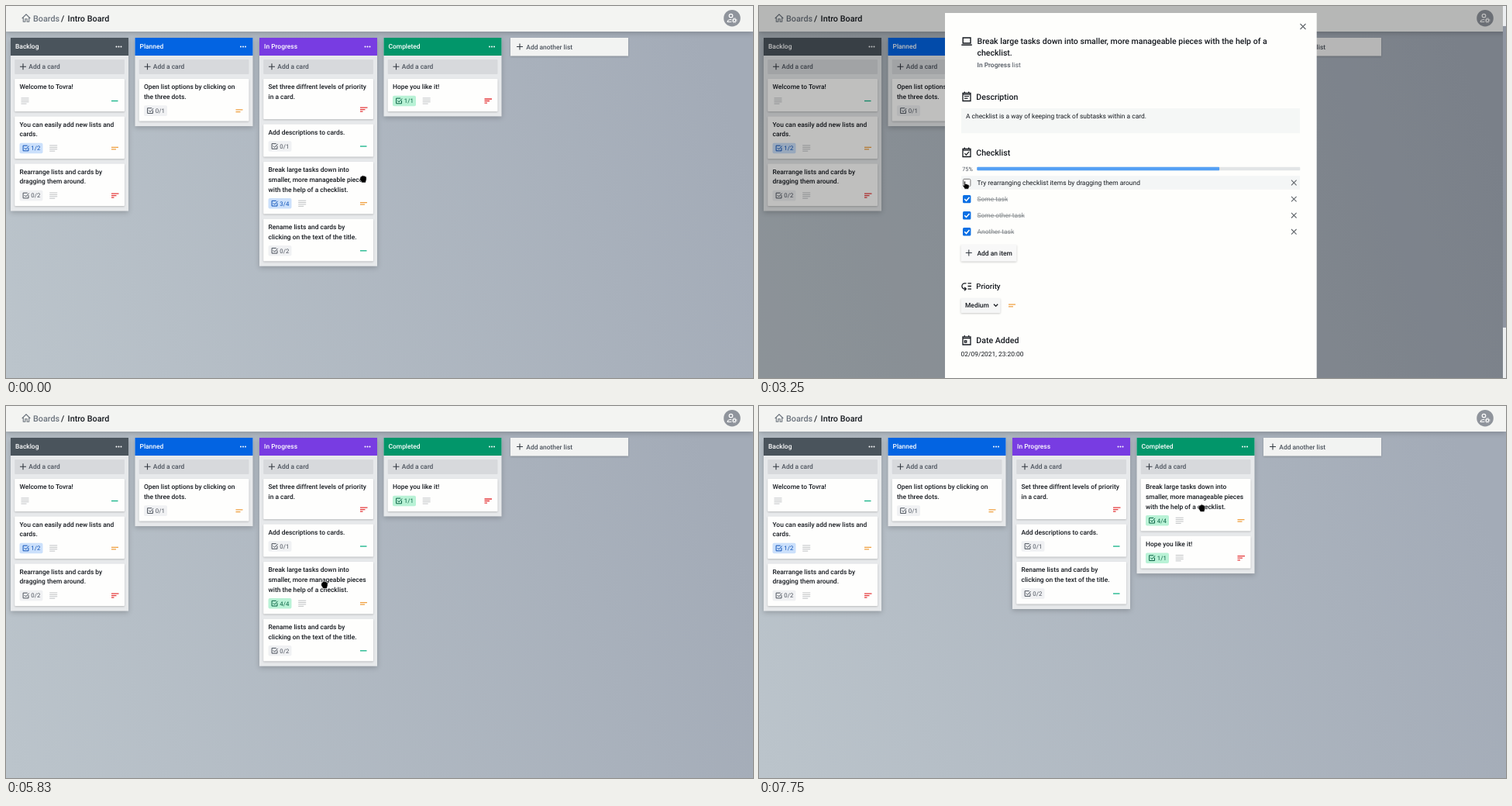
An HTML page that plays this animation: 964x480 px, repeating every 8 s.

```html
<!DOCTYPE html>
<html lang="en">
<head>
<meta charset="utf-8">
<title>Task board</title>
<style>
  html, body { margin: 0; height: 100%; overflow: hidden; }
  svg { display: block; width: 100vw; height: 100vh; }
  text { font: 500 8.43px Roboto, sans-serif; fill: #15191f; text-rendering: geometricPrecision; white-space: pre; }
  .plain { font-weight: 400; }
  .small { font-size: 7.8px; font-weight: 400; }
  .head { font-size: 10.6px; }
  .muted { fill: #4d545e; }
  .struck { font-weight: 400; fill: #858a8e; text-decoration: line-through; }
  .shadow { filter: drop-shadow(0 1px 1px rgba(0, 0, 0, .2)); }
  .lifted { filter: drop-shadow(0 2px 3px rgba(0, 0, 0, .2)); }
</style>
</head>
<body>
<svg id="stage" viewBox="0 0 964 480" preserveAspectRatio="none"></svg>
<script>
const LOOP = 8000, OPEN = 670, CHECK = 3330, CLOSE = 5000, LIFT = 5850, LEAVE = 6193, DROP = 6830, LANDED = 7100;
const LINE = 12.65, TOP = 94;
const INK = '#15191f';
const $ = id => document.getElementById(id);

// Drawing helpers
const rect = (x, y, w, h, fill, extra = '') =>
  `<rect x="${x}" y="${y}" width="${w}" height="${h}" fill="${fill}" ${extra}/>`;
const text = (x, y, s, extra = '') => `<text x="${x}" y="${y}" ${extra}>${s}</text>`;
const path = (d, color, width = 1.2) =>
  `<path d="${d}" fill="none" stroke="${color}" stroke-width="${width}"/>`;
const group = (x, y, body, extra = '') => `<g transform="translate(${x} ${y})" ${extra}>${body}</g>`;
const plus = (x, y) => path(`M${x - 4} ${y}h8M${x} ${y - 4}v8`, '#343a42', 1.1);
const cross = (x, y, r) => path(`M${x - r} ${y - r}l${2 * r} ${2 * r}m0 ${-2 * r}l${-2 * r} ${2 * r}`, '#62676c', 1.1);

const priorities = {
  low: ['#12b387', 'M0 0h8.5'],
  medium: ['#f0a040', 'M0-1.2h9M0 1.4h6'],
  high: ['#e53a3c', 'M0-2.5h9.5M0 0h6.5M0 2.6h3.5']
};
const priority = (x, y, kind) => group(x, y, path(priorities[kind][1], priorities[kind][0], 1.3));
const badgeColors = { idle: ['#f0f1f3', '#4c535d'], part: ['#cbe0fb', '#0f52b8'], full: ['#b9f2d6', '#0b6345'] };

function badge(label, kind) {
  const [back, ink] = badgeColors[kind];
  return rect(0, -6.8, 30, 13.6, back, 'rx="2"') +
    path('M11.5-.5V3.3H4.6V-3.4H10.2M6.3-.5l1.8 1.9 4-4.4', ink, 1) +
    text(14.8, 2.8, label, `class="small" style="fill:${ink}"`);
}

const cardHeight = c => 29.25 + LINE * c.lines.length - (c.bare ? 2.5 : 0);
const pitch = c => cardHeight(c) + 6.5;

function drawCard(c) {
  const row = 28.5 + LINE * (c.lines.length - 1) - (c.bare ? 1.6 : 0);
  return rect(0, 0, 141.8, cardHeight(c), '#fefefd', 'rx="1" class="shadow"') +
    c.lines.map((s, i) => text(6.3, 13.3 + i * LINE, s)).join('') +
    (c.badge ? group(6.3, row, badge(...c.badge), c.id ? `id="${c.id}Badge"` : '') : '') +
    (c.desc ? group(c.badge ? 45 : 8.3, row, path('M0-3.6h10M0-1.2h10M0 1.2h10M0 3.6h7', '#b9bcbf', .9)) : '') +
    priority(124.8, row, c.prio);
}

const lists = [
  { name: 'Backlog', color: '#4a545c', cards: [
    { lines: ['Welcome to Tovra!'], desc: true, prio: 'low' },
    { lines: ['You can easily add new lists and', 'cards.'], badge: ['1/2', 'part'], desc: true, prio: 'medium' },
    { lines: ['Rearrange lists and cards by', 'dragging them around.'], badge: ['0/2', 'idle'], desc: true, prio: 'high' }] },
  { name: 'Planned', color: '#0364e2', cards: [
    { lines: ['Open list options by clicking on', 'the three dots.'], badge: ['0/1', 'idle'], prio: 'medium' }] },
  { name: 'In Progress', color: '#783ce2', cards: [
    { id: 'levels', lines: ['Set three diffrent levels of priority', 'in a card.'], bare: true, prio: 'high' },
    { id: 'descs', lines: ['Add descriptions to cards.'], badge: ['0/1', 'idle'], prio: 'low' },
    { id: 'moved', lines: ['Break large tasks down into', 'smaller, more manageable pieces', 'with the help of a checklist.'],
      badge: ['3/4', 'part'], desc: true, prio: 'medium' },
    { id: 'rename', lines: ['Rename lists and cards by', 'clicking on the text of the title.'], badge: ['0/2', 'idle'], prio: 'low' }] },
  { name: 'Completed', color: '#02966a', cards: [
    { id: 'hope', lines: ['Hope you like it!'], badge: ['1/1', 'full'], desc: true, prio: 'high' }] }
];

let floating = '';
const home = {};

function drawList(list, i) {
  const x = 6 + 160.5 * i;
  let y = TOP, cards = '';
  for (const c of list.cards) {
    const g = group(x + 5.2, y, drawCard(c), c.id ? `id="${c.id}"` : '');
    if (c.id) home[c.id] = { x: x + 5.2, y };
    if (c.id === 'moved') floating = g; else cards += g;
    y += pitch(c);
  }
  list.height = y - 41;
  return rect(x, 41, 152, list.height, '#e7e9eb', `id="body${i}" class="lifted"`) +
    rect(x, 90, 152, y - 90, '#c8f2dd', `id="over${i}" opacity="0"`) +
    rect(x, 41, 152, 23, list.color) +
    text(x + 6, 55.3, list.name, 'style="fill:#fff"') +
    [-3, 0, 3].map(d => `<circle cx="${x + 139.5 + d}" cy="52.5" r="1" fill="#fff"/>`).join('') +
    rect(x + 5.2, 69, 141.8, 19, '#d7d9dc', 'rx="1"') + plus(x + 16, 78.3) +
    text(x + 23.3, 81.4, 'Add a card', 'class="muted"') + cards;
}

function drawHeader() {
  return rect(0, 0, 964, 33, '#f3f4f2', 'class="lifted"') +
    path('M20.7 16l5.3-5.2 5.3 5.2M22.3 15v5.2h2.5v-3.4h2.4v3.4h2.5V15', '#6b737d', 1.1) +
    text(35, 19.5, 'Boards', 'style="font-size:10.8px;fill:#6b737d"') +
    text(71, 19.5, '/', 'style="font-size:10.8px"') + text(79.6, 19.5, 'Intro Board', 'style="font-size:10.8px"') +
    '<circle cx="937" cy="15.7" r="10.8" fill="#8f949c"/>' +
    '<circle cx="935.5" cy="12.6" r="2.3" fill="none" stroke="#fff" stroke-width="1.2"/>' +
    path('M936 17.5c-3 0-4.8 1-4.8 3h5', '#fff') +
    '<circle cx="940" cy="18.6" r="1.8" fill="none" stroke="#fff" stroke-width="1.2"/>' +
    '<circle cx="940" cy="18.6" r="3" fill="none" stroke="#fff" stroke-dasharray="1.2 1.16"/>';
}

// Card dialog
const sheet = (y, mark) => group(268, y, path('M-5-4.6H5V5.5H-5ZM-5-2.8H5M-2.7-6.5v2M2.7-6.5v2', INK, 1.3) + path(mark, INK, 1.2));
const tick = y => rect(263, y - 5.2, 10.4, 10.4, '#0b6fe4', 'rx="1.5"') + path(`M265.3 ${y}l2.2 2.3 4-4.6`, '#fff', 1.5);
const doneItem = (y, label) => tick(y) + text(281.5, y + 3, label, 'class="struck"');
const firstItem = 'Try rearranging checklist items by dragging them around';
const items = ['Some task', 'Some other task', 'Another task'];

function drawDialog() {
  return rect(240, 41, 479.7, 551, '#fefefc') + cross(702, 58.5, 3.5) +
    path('M263.2 73h9.8v7h-9.8ZM261.3 82.3h13.5', INK, 1.4) +
    text(281.5, 81.2, 'Break large tasks down into smaller, more manageable pieces with the help of a', 'style="font-size:10.54px"') +
    text(281.5, 95.8, 'checklist.', 'style="font-size:10.54px"') +
    text(281.5, 111, 'In Progress<tspan class="plain"> list</tspan>', 'class="muted"') +
    sheet(149, 'M-3-.5H3M-3 2.2H1.5') + text(280.3, 152.5, 'Description', 'class="head"') +
    rect(261, 164, 437, 32.3, '#f5f7f6') +
    text(267, 177, 'A checklist is a way of keeping track of subtasks within a card.', 'class="plain"') +
    sheet(221, 'M-2.6 1.2l2 2 3.6-4') + text(280.3, 225, 'Checklist', 'class="head"') +
    text(275.8, 244.6, '75%', 'id="percent" class="plain" text-anchor="end" style="font-size:7.3px;fill:#4d545e"') +
    rect(281.3, 239.8, 417, 4.4, '#e2e5e6', 'rx="1"') + rect(281.3, 239.8, 0, 4.4, '#55a0f4', 'id="bar" rx="1"') +
    rect(261, 251.3, 437, 17.5, '#f4f6f6', 'id="hover"') +
    `<g id="todo">${rect(263.5, 255.3, 9.4, 9.4, '#fff', 'rx="1.3" stroke="#767676"')}${text(281.5, 263, firstItem, 'class="plain"')}</g>` +
    `<g id="done">${doneItem(260, firstItem)}</g>` +
    items.map((s, i) => doneItem(281.1 + 21.1 * i, s)).join('') +
    [0, 1, 2, 3].map(i => cross(690.3, 260 + 21.1 * i, 3.3)).join('') +
    rect(260.5, 340, 72, 21.5, '#f8f8f8', 'rx="1" class="shadow"') + plus(270.8, 350.5) + text(281.5, 353.6, 'Add an item') +
    group(268, 393.5, path('M1.5-3.6H6M1.5 0H6M1.5 3.6H6M-.5-3.6h-2a3.6 3.6 0 0 0 0 7.2h1.5M-2.8 1.5l2 2.1-2 2.1', INK, 1.3)) +
    text(280.3, 397, 'Priority', 'style="font-size:9.64px"') +
    rect(260.5, 409, 51, 19, '#f5f6f6', 'rx="1" class="shadow"') + text(266, 421.4, 'Medium') +
    path('M303 416.8l2.6 2.6 2.6-2.6', INK, 1.3) + priority(322, 418.4, 'medium') +
    sheet(463.5, 'M-2.6 .3h2.4v2.4h-2.4Z') + text(280.3, 467.4, 'Date Added', 'class="head"') +
    text(260.5, 484, '02/09/2021, 23:20:00', 'class="plain"');
}

const pointers = {
  arrow: 'M0 0V9.2L2.2 7.2 3.6 10.4 5 9.8 3.6 6.7H6.5Z',
  fist: 'M-4-1.2C-4-3-2.8-3.6-2-3.2-1.5-4.4-.2-4.4.3-3.7 1-4.4 2.2-4 2.4-3.1 3.4-3.3 4.2-2.6 4.2-1.6V.8C4.2 2.4 3.2 3.2 3.2 5H-2C-2 3.6-4.4 1.6-4.4.4Z',
  finger: 'M-2.4-4C-2.4-5.4-.7-5.4-.7-4V-1.2C0-1.8 1-1.5 1.2-.9 2-1.3 2.8-.8 2.9-.2 3.7-.4 4.2.1 4.2.9V2.4C4.2 3.6 3.3 4 3.3 5.2H-1.6C-1.6 3.8-4 2-4.2.6-4.2-.4-3-.2-2.4.6Z'
};

$('stage').innerHTML =
  '<defs><linearGradient id="sky" gradientUnits="userSpaceOnUse" x1="0" y1="460" x2="930" y2="120">' +
  '<stop stop-color="#bbc4cb"/><stop offset="1" stop-color="#a3abb7"/></linearGradient></defs>' +
  rect(0, 0, 964, 480, 'url(#sky)') + drawHeader() + lists.map(drawList).join('') +
  rect(651, 41, 152, 23.5, '#f2f3f2', 'class="shadow"') + plus(663, 52.5) + text(671.3, 55.5, 'Add another list', 'class="muted"') +
  floating +
  `<g id="dialog">${rect(0, 0, 964, 480, '#000', 'opacity=".25"')}<g id="page">${drawDialog()}</g>` +
  rect(960, 0, 4, 480, '#eceef0') + rect(960, 0, 4, 389, '#8f95a1', 'id="thumb"') + '</g>' +
  '<path id="pointer" fill="#000" stroke="#fff" stroke-width=".6"/>';

// Motion
const smooth = u => u * u * (3 - 2 * u);
const out = u => 1 - (1 - u) ** 3;
function tween(t, keys, ease = smooth) {
  let [a, v] = keys[0];
  for (const [b, w] of keys.slice(1)) {
    if (t < b) return v + (w - v) * ease((t - a) / (b - a));
    a = b; v = w;
  }
  return v;
}
const set = (id, name, value) => $(id).setAttribute(name, value);
const show = (id, on) => set(id, 'display', on ? 'inline' : 'none');
const move = (id, dx, dy) => set(id, 'transform', `translate(${home[id].x + dx} ${home[id].y + dy})`);

const pathX = [[0, 461], [330, 423], [1420, 423], [2200, 268.5], [2650, 268.5], [3000, 267], [3850, 267], [4670, 705],
  [5000, 705], [5750, 411], [LIFT, 411], [6615, 571.5]];
const pathY = [[0, 223], [330, 226], [670, 226], [830, 225], [1420, 225], [2200, 252.5], [2650, 252.5], [3000, 231], [3850, 231],
  [4670, 23], [5000, 23], [5750, 230.5], [LIFT, 230.5], [6240, 121], [6600, 131.5]];
const shapes = [[0, 'fist'], [OPEN, 'arrow'], [2060, 'fist'], [2750, 'finger'], [3960, 'arrow'], [5600, 'fist']];
const slot = pitch(lists[2].cards[2]);
let wasDone;

function draw(t) {
  const x = tween(t, pathX), y = tween(t, pathY);
  const shape = shapes.filter(s => s[0] <= t).pop()[1];
  set('pointer', 'd', pointers[shape]);
  set('pointer', 'transform', `translate(${x} ${y})`);

  const done = t >= CHECK;
  if (done !== wasDone) {
    $('movedBadge').innerHTML = done ? badge('4/4', 'full') : badge('3/4', 'part');
    $('percent').textContent = done ? '100%' : '75%';
    set('bar', 'fill', done ? '#10b981' : '#55a0f4');
    show('todo', !done);
    show('done', done);
    wasDone = done;
  }

  const scroll = tween(t, [[0, 0], [2205, 0], [2610, 32]]);
  show('dialog', t >= OPEN && t < CLOSE);
  show('hover', t >= 2060 && t < 4000);
  set('page', 'transform', `translate(0 ${-scroll})`);
  set('thumb', 'y', scroll * .81);
  set('bar', 'width', tween(t, [[0, 312.8], [CHECK, 312.8], [3700, 417]]));

  // Cards make room for the one being dragged
  const fall = tween(t, [[0, 0], [DROP, 0], [LANDED, 1]], out);
  const dx = x - 411, dy = y - 230.5;
  const lifted = t >= LIFT;
  move('moved', lifted ? dx + (160.5 - dx) * fall : 0, lifted ? dy + (TOP - home.moved.y - dy) * fall : 0);
  move('levels', 0, tween(t, [[0, 0], [6080, 0], [LEAVE, 46], [6400, 0]], out));
  move('descs', 0, tween(t, [[0, 0], [5980, 0], [6130, slot], [LEAVE, slot], [6400, 0]], out));
  move('rename', 0, tween(t, [[0, 0], [LEAVE, 0], [6400, -slot]], out));
  const room = tween(t, [[0, 0], [6255, 0], [6460, slot]], out);
  move('hope', 0, room);
  const shrink = tween(t, [[0, 0], [LANDED, 0], [7320, slot]], out);
  set('body2', 'height', lists[2].height - shrink);
  set('body3', 'height', lists[3].height + room);
  set('over3', 'height', lists[3].height - 49 + room);
  set('over2', 'opacity', lifted && t < LEAVE ? 1 : 0);
  set('over3', 'opacity', t >= LEAVE && t < LANDED ? 1 : 0);
}

const start = performance.now();
function tick60() {
  draw((performance.now() - start) % LOOP);
  requestAnimationFrame(tick60);
}
tick60();
</script>
</body>
</html>
```
